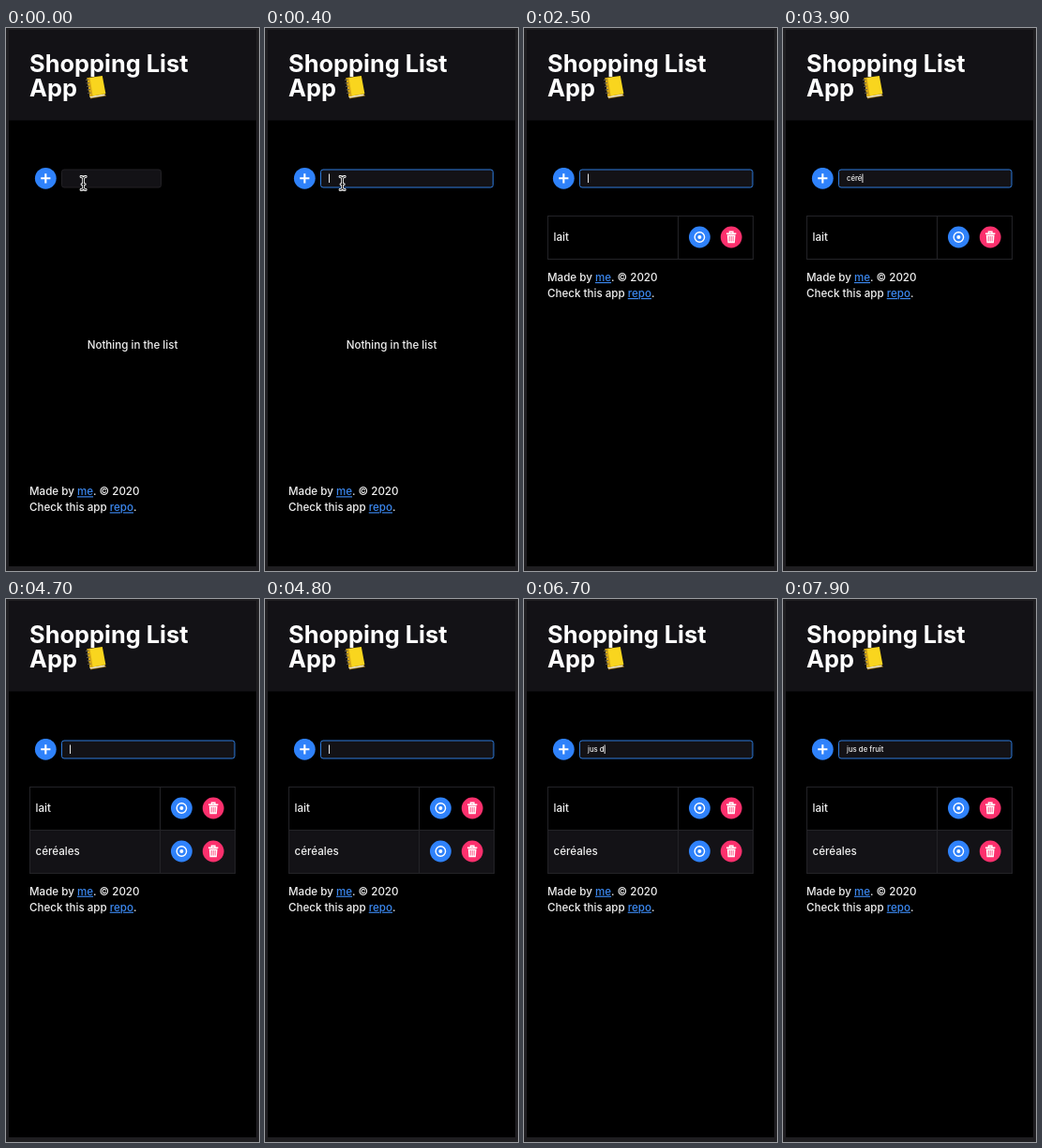
Write an HTML page that moves like this. It is 270 by 579 pixels and loops after 8000 ms.

```html
<!DOCTYPE html>
<html lang="en">
<head>
<meta charset="utf-8">
<title>Shopping List App</title>
<style>
  html, body { margin: 0; width: 100%; height: 100%; overflow: hidden; background: #1f1e21; }
  svg { display: block; width: 270px; height: 579px; }
  text { font: 500 11.6px Inter, sans-serif; fill: #f0f0f0; white-space: pre; }
  .title { font-size: 25.4px; font-weight: 700; fill: #fff; }
  .typed { font-size: 7.75px; }
  .link { fill: #3b87ee; text-decoration: underline; }
  .line { stroke: #232327; fill: none; }
  .icon { stroke: #fff; fill: none; }
</style>
</head>
<body>
<svg viewBox="0 0 270 579">
  <defs>
    <g id="actions">
      <circle cx="187.4" cy="23" r="11.4" fill="#2f82fb"/>
      <circle class="icon" cx="187.4" cy="23" r="5.2" stroke-width="1.4"/>
      <circle cx="187.4" cy="23" r="2" fill="#fff"/>
      <circle cx="221.2" cy="23" r="11.4" fill="#fc306d"/>
      <path class="icon" d="M216 19.2h10.4M219.4 18.6v-1.3h3.6v1.3" stroke-width="1.4"/>
      <path d="M216.8 20.6h8.8l-.7 8.6h-7.4z" fill="#fff"/>
      <path d="M219.2 22v5.6M221.2 22v5.6M223.2 22v5.6" stroke="#fc306d" stroke-width=".8"/>
    </g>
  </defs>

  <rect x="3" y="2" width="264" height="572"/>
  <rect x="3" y="2" width="264" height="96.5" fill="#131216"/>
  <text class="title" x="25" y="47">Shopping List</text>
  <text class="title" x="25" y="72.5">App</text>

  <g id="notebook">
    <path d="M87 53.5L90 75.5 107 72.5 105 69z" fill="#8f6b12"/>
    <path d="M89 73l16-2.6.8 1.7-15.4 2.5z" fill="#e8e2cf"/>
    <path d="M86.5 53.2L102.8 51 106.4 70 89.6 73z" fill="#f9d51e"/>
    <path d="M86.5 53.2l3-.4 3.2 19.7-3.1.5z" fill="#d9a916"/>
    <path d="M85 55.5l3.4-.5M85.5 59l3.4-.5M86.1 62.5l3.4-.5M86.6 66l3.4-.5M87.2 69.5l3.4-.5" stroke="#655f50" stroke-width="1.2"/>
  </g>

  <circle cx="42.3" cy="160.3" r="11.4" fill="#2f82fb"/>
  <path class="icon" d="M37.2 160.3h10.2M42.3 155.2v10.2" stroke-width="2.1"/>

  <rect id="field" x="59.5" y="151" height="19" rx="2.5" fill="#131216"/>
  <text id="typed" class="typed" x="68" y="163"></text>
  <rect id="caret" y="155.5" width="1" height="9.5" fill="#e8e8e8"/>

  <text id="empty" x="135" y="341.5" text-anchor="middle">Nothing in the list</text>

  <g id="rows"></g>

  <g id="footer">
    <text x="25" y="0">Made by <tspan class="link">me</tspan>. © 2020</text>
    <text x="25" y="17">Check this app <tspan class="link">repo</tspan>.</text>
  </g>

  <g id="pointer" fill="none" stroke-linecap="round">
    <path id="beam" d="M80 158.5q2.6 0 2.6 2v10q0 2-2.6 2M85.2 158.5q-2.6 0-2.6 2v10q0 2 2.6 2M81 166.7h3.2" stroke="#fff" stroke-width="2.8"/>
    <path d="M80 158.5q2.6 0 2.6 2v10q0 2-2.6 2M85.2 158.5q-2.6 0-2.6 2v10q0 2 2.6 2M81 166.7h3.2" stroke="#111" stroke-width="1"/>
  </g>
</svg>
<script>
const LOOP = 8000, FOCUS = 50, GROW = 400, BLINK = 500;
const $ = id => document.getElementById(id);

// Each entry: text, time of every keystroke, time of Enter
const entries = [
  { text: 'lait ', keys: [1050, 1200, 1320, 1450, 1620], enter: 2280 },
  { text: 'céréales', keys: [3280, 3480, 3680, 3880, 3980, 4080, 4180, 4290], enter: 4560 },
  { text: 'jus de fruit', keys: [6080, 6230, 6350, 6480, 6660, 6780, 6880, 6980, 7080, 7180, 7280, 7370], enter: Infinity }
];

const rows = entries.slice(0, 2).map((entry, i) => {
  $('rows').insertAdjacentHTML('beforeend', `
    <g transform="translate(0 ${200 + 46 * i})">
      <rect class="line" x="25.5" y=".5" width="219" height="46" style="fill:${i % 2 ? '#131216' : '#000'}"/>
      <path class="line" d="M164.5 0v46"/>
      <text x="31.5" y="27">${entry.text.trim()}</text>
      <use href="#actions"/>
    </g>`);
  return $('rows').lastElementChild;
});

// CSS "ease": cubic-bezier(.25, .1, .25, 1)
function ease(x) {
  if (x <= 0 || x >= 1) return Math.min(1, Math.max(0, x));
  const bezier = (a, b, s) => 3 * a * s * (1 - s) ** 2 + 3 * b * s * s * (1 - s) + s ** 3;
  let low = 0, high = 1;
  for (let i = 0; i < 20; i++) {
    const mid = (low + high) / 2;
    if (bezier(.25, .25, mid) < x) low = mid; else high = mid;
  }
  return bezier(.1, 1, low);
}

const show = (el, visible) => el.setAttribute('visibility', visible ? 'visible' : 'hidden');

function draw(t) {
  const focused = t >= FOCUS;
  const count = entries.filter(e => t >= e.enter).length;
  const { text, keys } = entries[count];
  const pressed = keys.filter(k => t >= k);
  const lastInput = Math.max(FOCUS, ...pressed, ...entries.slice(0, count).map(e => e.enter));

  $('field').setAttribute('width', 106 + 78.5 * ease((t - FOCUS) / GROW));
  $('field').setAttribute('stroke', focused ? '#2e7bdc' : '#222125');
  $('typed').textContent = text.slice(0, pressed.length);
  $('caret').setAttribute('x', 68 + (pressed.length ? $('typed').getComputedTextLength() : 0));
  show($('caret'), focused && Math.floor((t - lastInput) / BLINK) % 2 === 0);
  show($('pointer'), t < entries[0].keys[0]);
  show($('empty'), count === 0);
  rows.forEach((row, i) => show(row, i < count));
  $('footer').setAttribute('transform', `translate(0 ${count ? 224.3 + 45.7 * count : 498.3})`);
}

function tick() {
  draw(performance.now() % LOOP);
  requestAnimationFrame(tick);
}
tick();
</script>
</body>
</html>
```
